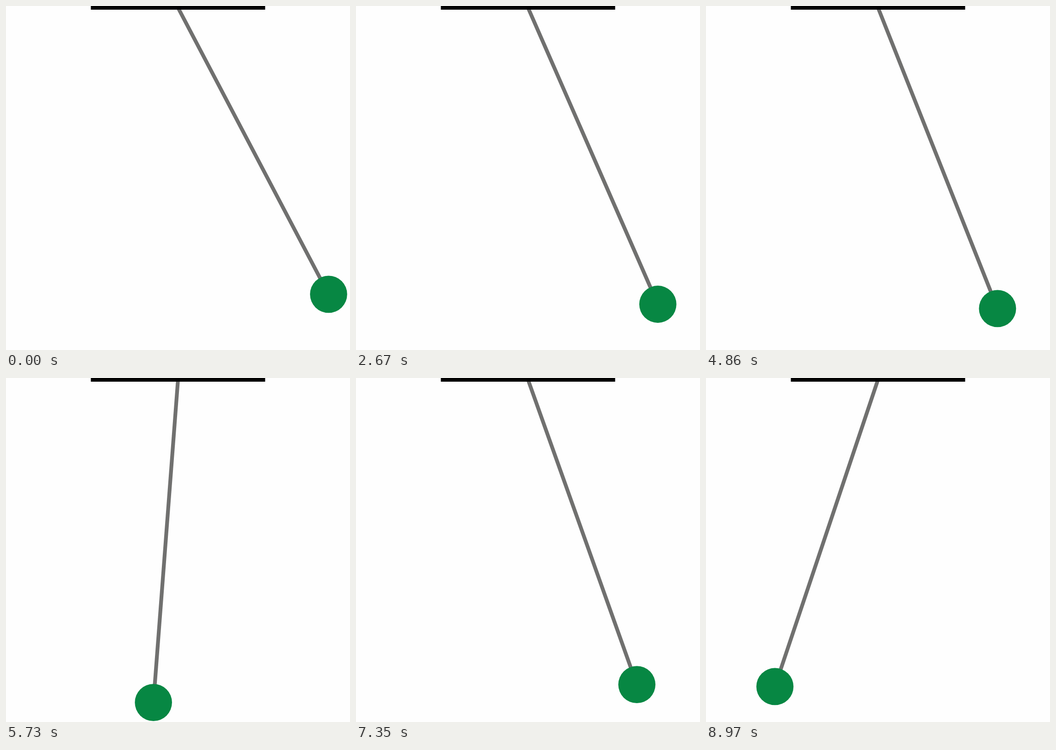
An HTML page with a canvas for the animation above (9000 ms loop, 748 by 748 pixels).

```html
<!DOCTYPE html>
<html lang="en">
<head>
<meta charset="utf-8">
<title>Damped pendulum</title>
<style>
html, body { margin: 0; width: 100%; height: 100%; overflow: hidden; background: #fefefe; }
canvas { display: block; width: 748px; height: 748px; }
</style>
</head>
<body>
<canvas id="stage" width="748" height="748"></canvas>
<script>
const ctx = document.getElementById('stage').getContext('2d');
const SIZE = 748, LOOP = 9000, STEP = 30;
const pivot = { x: 374, y: 3.6 };
const rod = 704, radius = 40.4;

const startAngle = 27.72 * Math.PI / 180;
const damping = 3.2e-5;      // per ms
const halfPeriod = 1240.2;   // ms, for small swings
const lag = 4;               // ms, released from rest

// Wide swings run slower: the delay grows with the squared amplitude.
function angleAt(t) {
  const delay = startAngle ** 2 / 16 * (1 - Math.exp(-2 * damping * t)) / (2 * damping);
  const phase = Math.PI * (t - delay - lag) / halfPeriod;
  return startAngle * Math.exp(-damping * t) * Math.cos(phase);
}

function draw(t) {
  const angle = angleAt(t);
  const x = pivot.x + rod * Math.sin(angle);
  const y = pivot.y + rod * Math.cos(angle);

  ctx.fillStyle = '#fefefe';
  ctx.fillRect(0, 0, SIZE, SIZE);

  ctx.strokeStyle = '#70706f';
  ctx.lineWidth = 8.2;
  ctx.beginPath();
  ctx.moveTo(pivot.x, pivot.y);
  ctx.lineTo(x, y);
  ctx.stroke();

  ctx.fillStyle = '#078743';
  ctx.beginPath();
  ctx.arc(x, y, radius, 0, 2 * Math.PI);
  ctx.fill();

  ctx.fillStyle = '#000';
  ctx.fillRect(184.5, 0, 379, 8);
}

const start = performance.now();
function tick() {
  const t = (performance.now() - start) % LOOP;
  draw(Math.floor(t / STEP) * STEP);
  requestAnimationFrame(tick);
}
tick();
</script>
</body>
</html>
```
